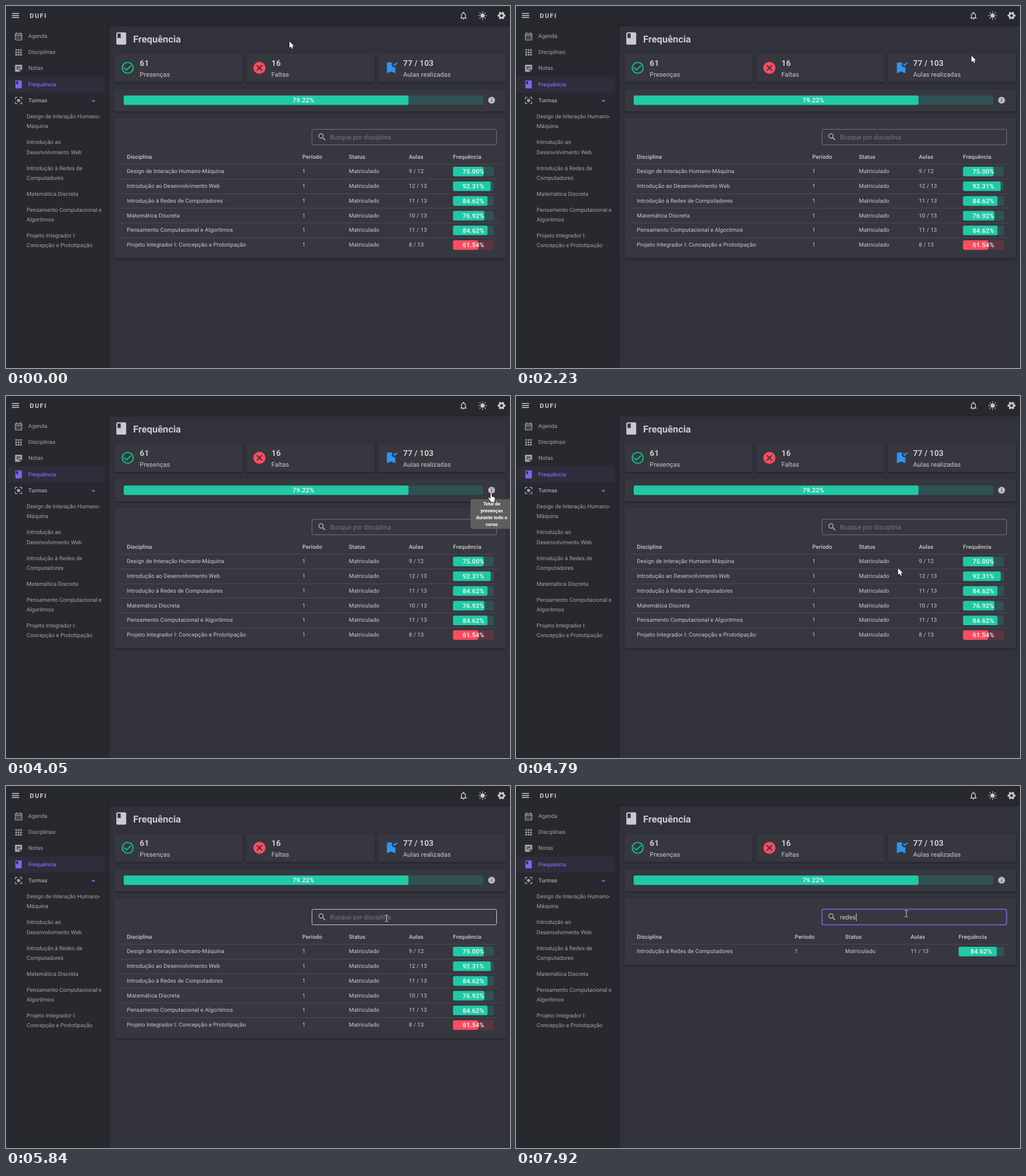
An HTML page with a canvas that plays this animation: 882 by 635 pixels, repeating every 8000 ms.

```html
<!DOCTYPE html>
<html lang="pt-BR">
<head>
<meta charset="utf-8">
<title>Frequência</title>
<style>
html, body { margin: 0; width: 100%; height: 100%; overflow: hidden; background: #32323d; }
canvas { display: block; width: 882px; height: 635px; }
</style>
</head>
<body>
<canvas id="stage" width="882" height="635"></canvas>
<script>
const ctx = document.getElementById('stage').getContext('2d');
const LOOP = 8000;
const C = {
  page: '#32323d', bar: '#28282f', card: '#37373f', line: '#4b4b53',
  text: '#cbcbce', soft: '#a2a2a7', purple: '#7b69ec',
  green: '#20c9a6', greenTrack: '#2f5354', red: '#fc4c60', redTrack: '#5d3541'
};

// Icons on a 24-unit grid
const ICON = {
  menu: 'M3 18h18v-2H3zM3 13h18v-2H3zM3 6v2h18V6z',
  bell: 'M12 22c1.1 0 2-.9 2-2h-4c0 1.1.9 2 2 2zm6-6v-5c0-3.07-1.63-5.64-4.5-6.32V4c0-.83-.67-1.5-1.5-1.5s-1.5.67-1.5 1.5v.68C7.64 5.36 6 7.92 6 11v5l-2 2v1h16v-1zm-2 1H8v-6c0-2.48 1.51-4.5 4-4.5s4 2.02 4 4.5z',
  calendar: 'M19 4h-1V2h-2v2H8V2H6v2H5c-1.1 0-2 .9-2 2v14c0 1.1.9 2 2 2h14c1.1 0 2-.9 2-2V6c0-1.1-.9-2-2-2zm0 16H5V10h14zm0-12H5V6h14zM7 12h2v2H7zM11 12h2v2h-2zM15 12h2v2h-2zM7 16h2v2H7zM11 16h2v2h-2zM15 16h2v2h-2z',
  grid: [4, 10, 16].map(y => [4, 10, 16].map(x => `M${x} ${y}h4v4h-4z`).join('')).join(''),
  note: 'M19 3H5c-1.1 0-2 .9-2 2v14c0 1.1.9 2 2 2h10l6-6V5c0-1.1-.9-2-2-2zM7 8h10v2H7zM12 14H7v-2h5zM14 19.5V14h5.5z',
  book: 'M18 2H6c-1.1 0-2 .9-2 2v16c0 1.1.9 2 2 2h12c1.1 0 2-.9 2-2V4c0-1.1-.9-2-2-2zM6 4h5v8l-2.5-1.5L6 12z',
  focus: 'M12 8a4 4 0 1 0 0 8a4 4 0 1 0 0-8zM5 15H3v4c0 1.1.9 2 2 2h4v-2H5zM5 5h4V3H5c-1.1 0-2 .9-2 2v4h2zM19 3h-4v2h4v4h2V5c0-1.1-.9-2-2-2zM19 19h-4v2h4c1.1 0 2-.9 2-2v-4h-2z',
  check: 'M16.59 7.58L10 14.17l-3.59-3.58L5 12l5 5 8-8zM12 2a10 10 0 1 0 0 20a10 10 0 1 0 0-20zm0 18a8 8 0 1 1 0-16a8 8 0 1 1 0 16z',
  cancel: 'M12 2a10 10 0 1 0 0 20a10 10 0 1 0 0-20zM17 15.59L15.59 17 12 13.41 8.41 17 7 15.59 10.59 12 7 8.41 8.41 7 12 10.59 15.59 7 17 8.41 13.41 12z',
  bookmark: 'M19 21l-7-3-7 3V5c0-1.1.9-2 2-2h7c-.63.84-1 1.87-1 3 0 2.76 2.24 5 5 5 .34 0 .68-.03 1-.1zM17.83 9L15 6.17l1.41-1.41 1.41 1.41 3.54-3.54 1.41 1.41z',
  info: 'M12 2a10 10 0 1 0 0 20a10 10 0 1 0 0-20zM13 17h-2v-6h2zM13 9h-2V7h2z',
  search: 'M15.5 14h-.79l-.28-.27a6.5 6.5 0 1 0-.7.7l.27.28v.79l5 4.99L20.49 19zm-6 0a4.5 4.5 0 1 1 0-9a4.5 4.5 0 1 1 0 9z'
};
for (const k in ICON) ICON[k] = new Path2D(ICON[k]);
const ARROW = new Path2D('M0 0V11.6L2.7 9.1L4.5 13.1L6.4 12.3L4.7 8.4H8.2Z');
const HAND = new Path2D('M-1 1Q0-.8 1 1V5.5L5.8 6.8Q7 7.3 6.8 9L6 12.5V15H-.8V13.3L-4.6 8.8Q-4.8 7-3 7.6L-1 9.2Z');

const courses = [
  ['Design de Interação Humano-Máquina', 9, 12],
  ['Introdução ao Desenvolvimento Web', 12, 13],
  ['Introdução à Redes de Computadores', 11, 13],
  ['Matemática Discreta', 10, 13],
  ['Pensamento Computacional e Algoritmos', 11, 13],
  ['Projeto Integrador I: Concepção e Prototipação', 8, 13]
];
const typed = [[6900, 'r'], [7160, 're'], [7370, 'red'], [7580, 'rede'], [7880, 'redes']];
const FOCUS = 6120;

// Pointer path: time, x, y
const path = [
  [0, 496, 62], [130, 484, 58], [430, 392, 86], [810, 297, 123], [860, 296, 124], [1060, 296, 124],
  [1100, 305, 118], [1330, 405, 87], [1580, 513, 112], [1800, 513, 112],
  [2070, 680, 78], [2230, 797, 87], [2350, 794, 85], [2500, 794, 85],
  [2960, 850, 168], [4020, 850, 168], [4120, 838, 186], [4450, 745, 250],
  [4790, 669, 302], [4870, 630, 312], [5070, 214, 345], [5270, 450, 422],
  [5470, 839, 370], [5640, 745, 272], [5740, 685, 242], [5840, 666, 232], [8000, 666, 232]
];

function pointerAt(t) {
  if (t >= 7900) return { x: 683, y: 224 };
  let i = 0;
  while (i < path.length - 2 && t >= path[i + 1][0]) i++;
  const a = path[i], b = path[i + 1], span = b[0] - a[0], u = (t - a[0]) / span;
  const slope = (j, k) => {
    const p = path[j - 1], q = path[j], r = path[j + 1];
    if (!p || !r) return 0;
    const before = q[k] - p[k], after = r[k] - q[k];
    return before * after <= 0 ? 0 : (r[k] - p[k]) / (r[0] - p[0]);
  };
  const along = k => {
    const d = b[k] - a[k], m = slope(i, k) * span, n = slope(i + 1, k) * span;
    return a[k] + u * (m + u * (3 * d - 2 * m - n + u * (m + n - 2 * d)));
  };
  return { x: along(1), y: along(2) };
}

function text(str, x, mid, { size = 9.8, weight = 400, color = C.text, gap = 0, align = 'left' } = {}) {
  ctx.font = `${weight} ${size}px Roboto, sans-serif`;
  ctx.letterSpacing = gap + 'px';
  ctx.textAlign = align;
  ctx.fillStyle = color;
  ctx.fillText(str, x, mid + size * 0.356);
}

function box(x, y, w, h, r, color) {
  ctx.beginPath();
  ctx.roundRect(x, y, w, h, r);
  ctx.fillStyle = color;
  ctx.fill();
}

function shadowed(draw, blur = 3, dx = 0, dy = 1.2) {
  ctx.save();
  ctx.shadowColor = 'rgba(0,0,0,.4)';
  ctx.shadowBlur = blur;
  ctx.shadowOffsetX = dx;
  ctx.shadowOffsetY = dy;
  draw();
  ctx.restore();
}

const card = (x, y, w, h) => shadowed(() => box(x, y, w, h, 3, C.card));

function icon(name, cx, cy, color, scale = 0.7) {
  ctx.save();
  ctx.translate(cx - 12 * scale, cy - 12 * scale);
  ctx.scale(scale, scale);
  ctx.fillStyle = color;
  ctx.fill(ICON[name], 'evenodd');
  ctx.restore();
}

function disc(x, y, r, color) {
  ctx.beginPath();
  ctx.arc(x, y, r, 0, Math.PI * 2);
  ctx.fillStyle = color;
  ctx.fill();
}

function spokes(cx, cy, count, from, to, width, color) {
  ctx.strokeStyle = color;
  ctx.lineWidth = width;
  for (let i = 0; i < count; i++) {
    const a = i * Math.PI * 2 / count, c = Math.cos(a), s = Math.sin(a);
    ctx.beginPath();
    ctx.moveTo(cx + c * from, cy + s * from);
    ctx.lineTo(cx + c * to, cy + s * to);
    ctx.stroke();
  }
}

function progress(x, y, w, h, share) {
  const good = share >= 0.75;
  box(x, y, w, h, 2.8, good ? C.greenTrack : C.redTrack);
  box(x, y, w * share, h, 2.8, good ? C.green : C.red);
  text((share * 100).toFixed(2) + '%', x + w / 2, y + h / 2 + 0.1,
    { size: 11.2, weight: 700, color: 'rgba(255,255,255,.82)', gap: 0.1, align: 'center' });
}

function drawSidebar() {
  shadowed(() => { ctx.fillStyle = C.bar; ctx.fillRect(0, 0, 178.5, 635); }, 3, 1, 0);
  box(2, 124, 171, 28, 3, '#2f2d3b');
  [['calendar', 'Agenda', 53], ['grid', 'Disciplinas', 81], ['note', 'Notas', 109],
   ['book', 'Frequência', 137.3], ['focus', 'Turmas', 165.5]].forEach(([name, label, y], i) => {
    const color = i === 3 ? C.purple : C.soft;
    icon(name, 22, y + 0.3, color);
    text(label, 39, y, { color, weight: i > 2 ? 500 : 400 });
  });
  ctx.fillStyle = C.purple;
  ctx.beginPath();
  ctx.moveTo(149.5, 167.4);
  ctx.lineTo(153, 163.9);
  ctx.lineTo(156.5, 167.4);
  ctx.fill();
  [['Design de Interação Humano-', 193.7], ['Máquina', 211], ['Introdução ao', 239],
   ['Desenvolvimento Web', 256.3], ['Introdução à Redes de', 284.3], ['Computadores', 301.5],
   ['Matemática Discreta', 329.5], ['Pensamento Computacional e', 357.7], ['Algoritmos', 375],
   ['Projeto Integrador I:', 403], ['Concepção e Prototipação', 420]]
    .forEach(([label, y]) => text(label, 36, y, { color: C.soft }));
}

function drawHeader() {
  shadowed(() => { ctx.fillStyle = C.bar; ctx.fillRect(0, 0, 882, 33.5); }, 3, 0, 1);
  ctx.fillStyle = C.bar;
  ctx.fillRect(0, 30, 178, 10);
  icon('menu', 16.6, 16.8, C.text);
  text('DUFI', 41.5, 16.8, { size: 11.2, weight: 700, gap: 1.6 });
  icon('bell', 800.5, 17, C.text);
  disc(834, 16.8, 3.7, C.text);
  spokes(834, 16.8, 8, 5.3, 7.4, 1.4, C.text);
  disc(867.2, 16.8, 5.1, C.text);
  spokes(867.2, 16.8, 6, 3.5, 6.8, 3.6, C.text);
  disc(867.2, 16.8, 2.4, C.bar);
}

function drawSummary() {
  icon('book', 201.7, 57, C.text, 1.08);
  text('Frequência', 222.5, 58.3, { size: 16.8, weight: 700 });
  [[190, 224, 'check', 213, '#16b883', '61', 'Presenças'],
   [420.5, 224.5, 'cancel', 443.5, C.red, '16', 'Faltas'],
   [651, 224, 'bookmark', 674, '#2b95f8', '77 / 103', 'Aulas realizadas']]
    .forEach(([x, w, name, ix, color, count, label]) => {
      card(x, 84, w, 49.5);
      icon(name, ix, 108.5, color, 1.06);
      text(count, x + 44, 100.5, { size: 14, weight: 700, gap: 0.1 });
      text(label, x + 44, 119.7, { size: 11.2, gap: 0.1 });
    });
  card(190, 146, 685, 39);
  progress(206, 157, 629, 16.5, 61 / 77);
  icon('info', 849.8, 165.2, '#bdbdc0', 0.6);
}

function drawSearch(t, query, hover) {
  const focused = t >= FOCUS, edge = focused ? 1.6 : 1;
  ctx.beginPath();
  ctx.roundRect(535.5, 216.3, 323, 27.2, 2.8);
  ctx.strokeStyle = focused ? C.purple : hover ? '#d0d0d3' : '#74747b';
  ctx.lineWidth = edge;
  ctx.stroke();
  icon('search', 553, 229.7, '#bababd');
  text(query || 'Busque por disciplina', 567, 229.8, { size: 11.2, color: query ? C.text : '#77777e' });
  if (!focused) return;
  const since = typed.reduce((last, [at]) => t >= at ? at : last, FOCUS);
  if ((t - since) % 1000 < 500) {
    const w = query ? ctx.measureText(query).width : 0;
    ctx.fillStyle = C.text;
    ctx.fillRect(Math.round(567 + w), 223, 1, 14);
  }
}

function drawTable(t, query, hover) {
  const rows = courses.filter(([name]) => name.toLowerCase().includes(query));
  const narrow = query.length > 1;
  const cols = narrow ? [211.5, 487.7, 576, 690.5, 774.6] : [211.5, 518.5, 600, 705, 782.3];
  card(190, 196, 685, query.length > 2 ? 118 : 246.5);
  drawSearch(t, query, hover);
  ['Disciplina', 'Período', 'Status', 'Aulas', 'Frequência']
    .forEach((label, i) => text(label, cols[i], 264.8, { weight: 500, gap: 0.105 }));
  rows.forEach(([name, seen, total], i) => {
    const y = 290 + i * 25.8;
    ctx.fillStyle = C.line;
    ctx.fillRect(200, Math.round(y - 13), 664, 1);
    [name, '1', 'Matriculado', `${seen} / ${total}`]
      .forEach((cell, k) => text(cell, cols[k], y - 0.2, { gap: 0.105 }));
    progress(cols[4], y - 8, 853.6 - cols[4], 16.8, seen / total);
  });
}

function drawTooltip(t) {
  const clamp = v => Math.max(0, Math.min(1, v));
  const shown = t < 4000 ? clamp((t - 3030) / 220) : 1 - clamp((t - 4130) / 190);
  if (!shown) return;
  const scale = 0.75 + 0.25 * shown;
  ctx.save();
  ctx.globalAlpha = shown;
  ctx.translate(850, 181);
  ctx.scale(scale, scale);
  box(-37, 0, 74, 52, 2.8, 'rgba(97,97,97,.94)');
  ['Total de', 'presenças', 'durante todo o', 'curso'].forEach((line, i) =>
    text(line, 0, 8.3 + i * 11.75, { size: 8.4, weight: 700, color: '#fff', align: 'center' }));
  ctx.restore();
}

function drawPointer({ x, y }, hover) {
  ctx.save();
  ctx.translate(x, y);
  if (hover) {
    ctx.fillStyle = '#d4d4d6';
    ctx.fillRect(-0.5, -5.5, 1, 11);
    for (const end of [-6, 5]) {
      ctx.fillRect(-2.7, end, 2.2, 1);
      ctx.fillRect(0.5, end, 2.2, 1);
    }
  } else {
    const shape = Math.hypot(x - 850, y - 165) < 8 ? HAND : ARROW;
    ctx.lineWidth = 1.2;
    ctx.strokeStyle = '#101014';
    ctx.lineJoin = 'round';
    ctx.stroke(shape);
    ctx.fillStyle = '#fff';
    ctx.fill(shape);
  }
  ctx.restore();
}

function draw(t) {
  const query = typed.reduce((q, [at, s]) => t >= at ? s : q, '');
  const pointer = pointerAt(t);
  const hover = pointer.x > 535 && pointer.x < 859 && pointer.y > 216 && pointer.y < 244;
  ctx.fillStyle = C.page;
  ctx.fillRect(0, 0, 882, 635);
  drawSidebar();
  drawHeader();
  drawSummary();
  drawTable(t, query, hover);
  drawTooltip(t);
  // The pointer hides while typing
  if (t < 6900 || t >= 7900) drawPointer(pointer, hover);
}

ctx.textRendering = 'geometricPrecision';
const start = performance.now();
(function frame() {
  draw((performance.now() - start) % LOOP);
  requestAnimationFrame(frame);
})();
</script>
</body>
</html>
```
